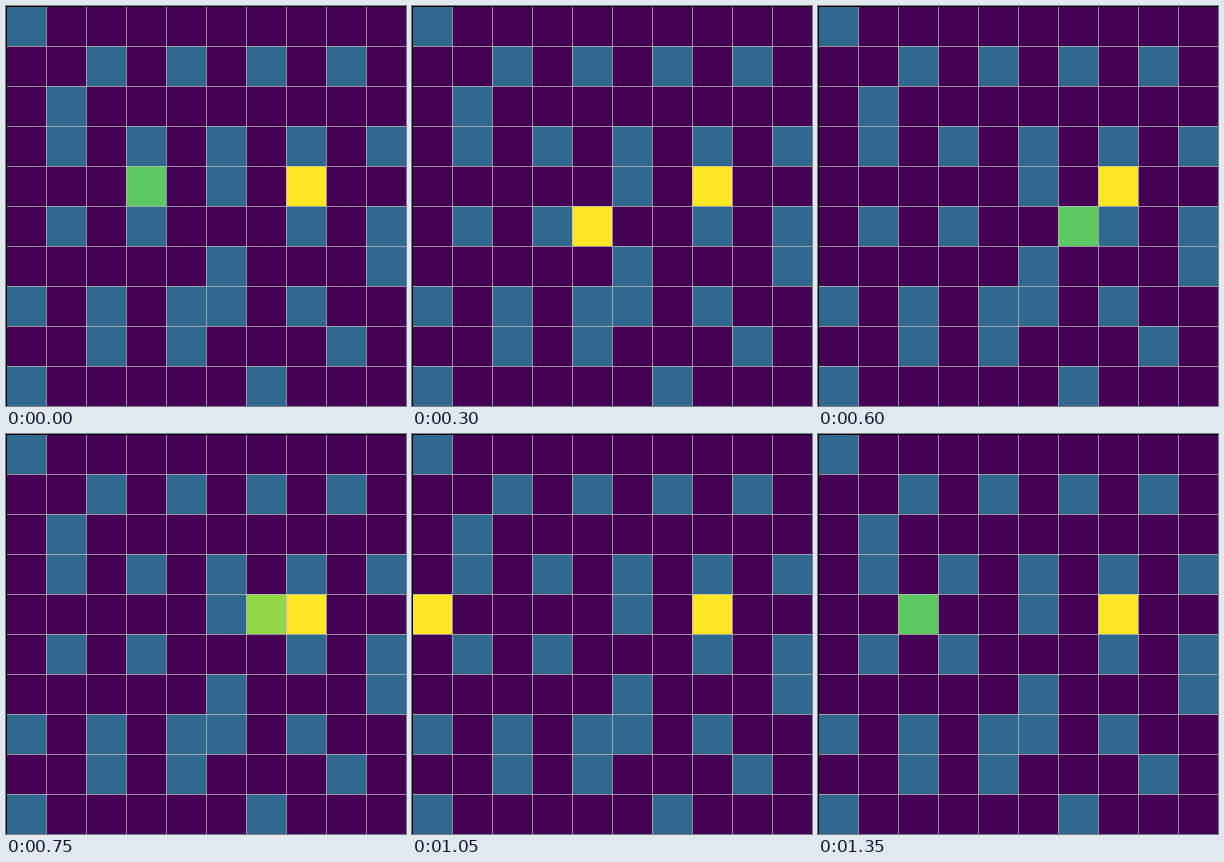
Animation, 400 px wide and 400 px high, one loop 1.5 s. Source, as an HTML page with a canvas:

```html
<!DOCTYPE html>
<html lang="en">
<head>
<meta charset="utf-8">
<title>Grid walk</title>
<style>
  html, body { margin: 0; width: 100%; height: 100%; overflow: hidden; background: #440154; }
  canvas { display: block; width: 400px; height: 400px; }
</style>
</head>
<body>
<canvas id="stage" width="400" height="400"></canvas>
<script>
const ctx = document.getElementById('stage').getContext('2d');
const SIZE = 400, CELL = 40, STEP = 150;
const FLOOR = '#440154', WALL = '#31688e', GOAL = '#fde725';
const LINE = 'rgba(187, 187, 187, 0.75)';

// The walker's colour shows the direction it last moved in.
const HEADING = { right: '#5ec962', up: '#90d743', down: '#fde725' };

const maze = [
  '#.........',
  '..#.#.#.#.',
  '.#........',
  '.#.#.#.#.#',
  '.....#....',
  '.#.#...#.#',
  '.....#...#',
  '#.#.##.#..',
  '..#.#...#.',
  '#.....#...'
];
const goal = [7, 4];

const path = [
  [3, 4, 'right'],
  [4, 4, 'right'],
  [4, 5, 'down'],
  [5, 5, 'right'],
  [6, 5, 'right'],
  [6, 4, 'up'],
  [7, 4, 'right'],
  [0, 4, 'down'],
  [1, 4, 'right'],
  [2, 4, 'right']
];

function fillCell(col, row, color) {
  ctx.fillStyle = color;
  ctx.fillRect(col * CELL, row * CELL, CELL, CELL);
}

function drawLines() {
  ctx.fillStyle = LINE;
  for (let p = CELL; p < SIZE; p += CELL) {
    ctx.fillRect(p, 0, 1, SIZE);
    ctx.fillRect(0, p, SIZE, 1);
  }
  ctx.fillStyle = '#000';
  ctx.fillRect(0, 0, 1, SIZE);
  ctx.fillRect(0, 0, SIZE, 1);
}

function draw(step) {
  const [col, row, heading] = path[step];
  maze.forEach((line, y) => {
    [...line].forEach((c, x) => fillCell(x, y, c === '#' ? WALL : FLOOR));
  });
  fillCell(...goal, GOAL);
  fillCell(col, row, HEADING[heading]);
  drawLines();
}

const start = performance.now();
function tick() {
  const elapsed = performance.now() - start;
  draw(Math.floor(elapsed / STEP) % path.length);
  requestAnimationFrame(tick);
}
tick();
</script>
</body>
</html>
```
